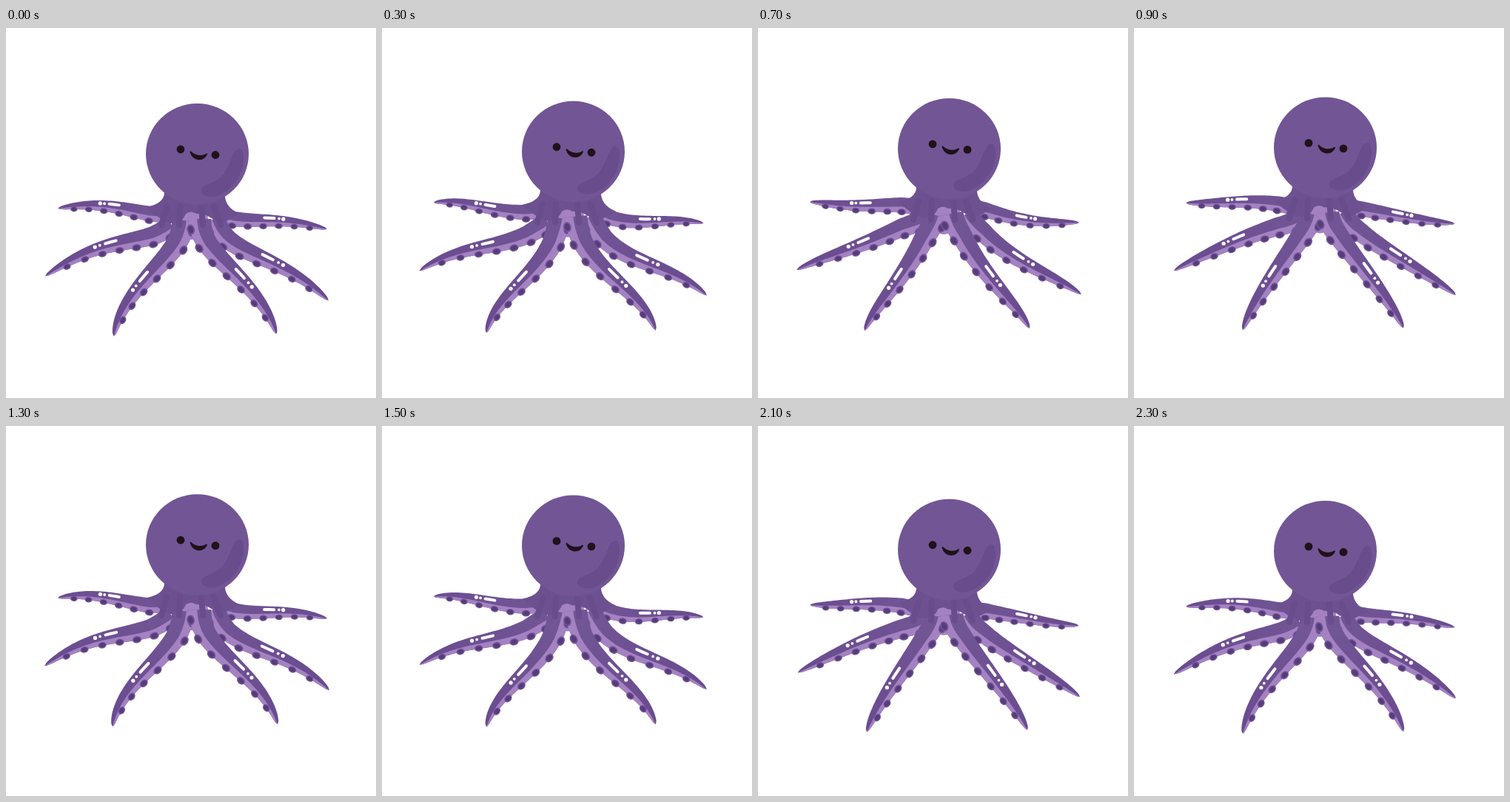
Write an HTML page with a canvas that moves like this. It is 500 by 500 pixels and loops after 2400 ms.

```html
<!DOCTYPE html>
<html lang="en">
<head>
<meta charset="utf-8">
<title>Octopus</title>
<style>
  html, body { margin: 0; width: 100%; height: 100%; overflow: hidden; background: #fff; }
  canvas { display: block; width: 500px; height: 500px; }
</style>
</head>
<body>
<canvas id="stage" width="500" height="500"></canvas>
<script>
const ctx = document.getElementById('stage').getContext('2d');
const LOOP = 2400, STEP = 100, WAVE = 1200, SWAY = 3.5;
const SKIN = '#725595', SKIRT = '#6d5090', SHADE = '#694c8b', LIGHT = '#a482c2',
      RING = '#73559a', CUP = '#573c7a', INK = '#1f1218';

// each arm: Bezier centre line at rest, base width, side its cups are on
const arm = (p0, p1, p2, p3, width, side) => ({ path: [p0, p1, p2, p3], width, side });
const arms = [
  arm([222, 250], [180, 251], [115, 239], [70, 242], 23, -1),
  arm([282, 246], [320, 268], [385, 262], [434, 270], 23, 1),
  arm([224, 266], [180, 293], [115, 296], [52, 334], 28, -1),
  arm([282, 258], [305, 310], [385, 323], [437, 367], 29, 1),
  arm([240, 260], [230, 315], [157, 365], [144, 416], 31, -1),
  arm([262, 258], [268, 312], [347, 360], [367, 413], 31, 1)
];

function bezier(path, s) {
  const r = 1 - s, k = [r * r * r, 3 * r * r * s, 3 * r * s * s, s * s * s];
  return [0, 1].map(axis => path.reduce((sum, p, i) => sum + k[i] * p[axis], 0));
}

// moves `shift` from p towards the cup side, at right angles to a-b
function offset(p, a, b, side, shift) {
  const dx = b[0] - a[0], dy = b[1] - a[1], k = side * shift / Math.hypot(dx, dy);
  return [p[0] - dy * k, p[1] + dx * k];
}

// centre line with a wave running from base to tip
function centre(m, s, t) {
  const wave = SWAY * Math.min(1, s / 0.2) * Math.cos(2 * Math.PI * (t - 1000 * s) / WAVE);
  const p = bezier(m.path, s);
  return offset(p, bezier(m.path, s - 0.01), bezier(m.path, s + 0.01), m.side, wave);
}

// s runs along the arm, v across it: 0 outer edge, 1 cup edge
function spot(m, s, v, t) {
  const shift = (v - 0.5) * m.width * Math.sqrt(1 - s);
  return offset(centre(m, s, t), centre(m, s - 0.02, t), centre(m, s + 0.02, t), m.side, shift);
}

function ribbon(m, v, t, color) {
  ctx.beginPath();
  for (let i = 0; i <= 50; i++) ctx.lineTo(...spot(m, i / 50, v, t));
  for (let i = 50; i >= 0; i--) ctx.lineTo(...spot(m, i / 50, 1, t));
  ctx.fillStyle = color;
  ctx.fill();
}

function oval(x, y, rx, ry, turn, color) {
  ctx.beginPath();
  ctx.ellipse(x, y, rx, ry, turn, 0, 2 * Math.PI);
  ctx.fillStyle = color;
  ctx.fill();
}

function line(points, width, color) {
  ctx.beginPath();
  points.forEach(p => ctx.lineTo(...p));
  ctx.lineWidth = width;
  ctx.strokeStyle = color;
  ctx.stroke();
}

function drawArm(m, t, skin) {
  ribbon(m, 0, t, skin);
  ribbon(m, 0.62, t, LIGHT);
  for (let s = 0.07; s < 0.9; s += 0.13) {
    const [x, y] = spot(m, s, 0.96, t);
    const [ax, ay] = spot(m, s - 0.03, 1, t), [bx, by] = spot(m, s + 0.03, 1, t);
    const turn = Math.atan2(by - ay, bx - ax);
    const r = (3.2 + m.width / 8) * (1 - 0.25 * s);
    oval(x, y, r, r * 0.76, turn, RING);
    oval(x, y, r * 0.72, r * 0.52, turn, CUP);
  }
  const gloss = s => spot(m, s, 0.28, t);
  oval(...gloss(0.625), 2.6, 2.6, 0, '#fff');
  oval(...gloss(0.59), 1.9, 1.9, 0, '#fff');
  line([0.55, 0.51, 0.47].map(gloss), 4, '#fff');
}

function drawSkirt() {
  ctx.beginPath();
  ctx.moveTo(214, 222);
  ctx.quadraticCurveTo(214, 237, 190, 242);
  ctx.quadraticCurveTo(206, 258, 222, 264);
  ctx.quadraticCurveTo(238, 264, 243, 251);
  ctx.quadraticCurveTo(250, 246, 257, 251);
  ctx.quadraticCurveTo(272, 250, 288, 264);
  ctx.quadraticCurveTo(302, 260, 316, 251);
  ctx.quadraticCurveTo(294, 242, 296, 222);
  ctx.fillStyle = SKIRT;
  ctx.fill();
  for (const [x, lean] of [[217, -7], [235, -1], [264, 2], [281, 9]])
    line([[x, 241], [x + lean, 266]], 8, SHADE);
}

function drawHead() {
  oval(258.5, 170.3, 69.5, 68.3, 0, SKIN);
  ctx.beginPath();
  ctx.moveTo(310, 166);
  ctx.bezierCurveTo(315, 161, 320, 163, 321, 173);
  ctx.bezierCurveTo(323, 195, 307, 220, 285, 227);
  ctx.bezierCurveTo(274, 230, 263, 226, 264, 219);
  ctx.bezierCurveTo(266, 211, 282, 210, 291, 201);
  ctx.bezierCurveTo(301, 190, 304, 175, 310, 166);
  ctx.fillStyle = SHADE;
  ctx.fill();
  oval(236, 164, 5.4, 5.4, 0, INK);
  oval(283, 171.5, 5.4, 5.4, 0, INK);
  ctx.beginPath();
  ctx.moveTo(249.5, 167.5);
  ctx.bezierCurveTo(253, 179, 266, 180.5, 271, 170.5);
  ctx.bezierCurveTo(265, 174.5, 255, 173.5, 249.5, 167.5);
  ctx.fillStyle = ctx.strokeStyle = INK;
  ctx.lineWidth = 2;
  ctx.fill();
  ctx.stroke();
}

// halfway between a triangle and a half sine
function lift(t) {
  const p = t / LOOP;
  return -5.15 * (Math.sin(Math.PI * p) + 1 - Math.abs(1 - 2 * p));
}

function draw(t) {
  ctx.fillStyle = '#fff';
  ctx.fillRect(0, 0, 500, 500);
  ctx.save();
  ctx.lineCap = ctx.lineJoin = 'round';
  ctx.translate(0, lift(t));
  const skin = ctx.createRadialGradient(250, 240, 40, 250, 240, 200);
  skin.addColorStop(0, SKIN);
  skin.addColorStop(1, '#694b8f');
  oval(251, 258, 22, 28, 0, LIGHT);
  arms.forEach(m => drawArm(m, t, skin));
  drawSkirt();
  drawHead();
  ctx.restore();
}

const start = performance.now();
function tick() {
  const t = (performance.now() - start) % LOOP;
  draw(Math.floor(t / STEP) * STEP);
  requestAnimationFrame(tick);
}
tick();
</script>
</body>
</html>
```
